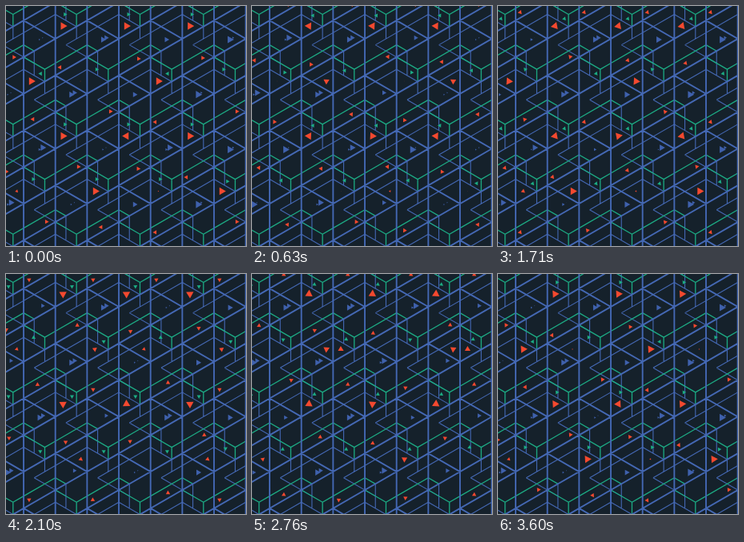
These frames come from a looping animation (300x300 px, 3.63 s). An HTML page with a canvas:

```html
<!DOCTYPE html>
<html lang="en">
<head>
<meta charset="utf-8">
<title>Isometric pattern</title>
<style>
html, body { margin: 0; width: 100%; height: 100%; overflow: hidden; background: #15212b; }
canvas { display: block; width: 300px; height: 300px; }
</style>
</head>
<body>
<canvas id="stage" width="300" height="300"></canvas>
<script>
const LOOP = 3630, TAU = Math.PI * 2;
const BG = '#15212b', BLUE = '#4468b4', DEEP = '#3f61ad', GREEN = '#1cab84', RED = '#f4492f';
const U = 13.222, V = U / Math.sqrt(3);
const ctx = document.getElementById('stage').getContext('2d');

// Static lattice: one motif in isometric units, repeated in staggered rows
const motif = [
  [BLUE, 1.1, [[1, 1, 6, -4], [1, 1, 4, 4], [4, 2, 4, 6], [-1, 7, -1, 9], [-3, 5, -1, 7], [-1, 7, 0, 6]]],
  [GREEN, 1.3, [[0, 4, 3, 1], [3, 1, 4, 2], [-3, 3, -1, 5], [-1, 5, 0, 4], [-1, 5, -1, 7]]],
  [BLUE, 1.9, [[-3, 3, 6, -6], [-3, -3, 0, 0], [0, -9, 0, 9]]]
];

function drawLattice(g) {
  g.fillStyle = BG;
  g.fillRect(0, 0, 300, 300);
  for (const [color, width, lines] of motif) {
    g.strokeStyle = color;
    g.lineWidth = width;
    g.beginPath();
    for (let row = -2; row < 6; row++) {
      for (let col = -2; col < 5; col++) {
        const x = 61.7 + col * 6 * U + (row & 1) * 3 * U, y = 41 + row * 9 * V;
        for (const [a, b, c, d] of lines) {
          g.moveTo(x + a * U, y + b * V);
          g.lineTo(x + c * U, y + d * V);
        }
      }
    }
    g.stroke();
  }
}

const lattice = document.createElement('canvas');
lattice.width = lattice.height = 300;
drawLattice(lattice.getContext('2d'));

function triangle(x, y, r, turn, color) {
  if (r < 0.2) return;
  ctx.fillStyle = color;
  ctx.beginPath();
  for (let i = 0; i < 3; i++) {
    const a = (turn + i / 3) * TAU;
    ctx.lineTo(x + r * Math.cos(a), y + r * Math.sin(a));
  }
  ctx.fill();
}

const wrap = t => t - Math.floor(t);
const wave = (t, peak) => Math.cos((t - peak) * TAU);
const dip = (t, low) => 2 * Math.sin(Math.PI * wrap(t - low)) - 1;
const hop = (t, low) => -dip(t, low);
const pulse = (t, peak) => {
  const d = Math.abs(wrap(t - peak + 0.5) - 0.5);
  return d < 0.18 ? Math.cos(d / 0.36 * Math.PI) : 0;
};

// Red sliders: centre, motion, phase
const sliders = [
  [-0.5, 70, dip, 0.4], [79, 70, wave, 0.5], [158.5, 70, dip, 0.7], [237, 70, dip, 0.345],
  [39, 138.5, hop, 0.74], [119, 138.5, wave, 0], [198, 138.5, hop, 0.48], [277, 138.5, wave, 0],
  [-0.5, 207.5, dip, 0.82], [79, 207.5, dip, 0.48], [158, 207.5, dip, 0.7], [237, 207.5, dip, 0],
  [39, 276.3, wave, 0], [119, 276.3, hop, 0.17], [198, 276.3, hop, 0.48], [277, 276.3, wave, 0],
  [39, 1.3, wave, 0], [119, 1.3, wave, 0], [198, 1.3, wave, 0], [277, 1.3, wave, 0]
];

// Red pulses: x, y, peak times
const pulses = [
  [13.5, 94, 0.46], [31.5, 94, 0], [93, 94, 0.25, 0.83], [111, 94, 0.68],
  [172.5, 94, 0.46], [190.5, 94, 0], [251.5, 94, 0.25, 0.83], [269.5, 94, 0.68],
  [13.5, 231.5, 0.87], [31.5, 231.5, 0.36], [93.5, 231.5, 0.47], [111.5, 231.5, 0],
  [172.5, 231.5, 0.32], [190.5, 231.5, 0.84], [252, 231.5, 0.47], [269.5, 231.5, 0]
];

// Phase shift of each blue pair, by row; null keeps both visible
const shifts = [
  [0, null, -0.08, 0.33], [0, null, -0.08, 0.33],
  [0.18, 0, 0.18, 0.33], [0.18, 0, -0.08, 0.33]
];

function drawBlue(t) {
  shifts.forEach((row, j) => row.forEach((shift, i) => {
    const x = 41.7 + i * 6 * U - (j & 1) * 3 * U, y = 42 + j * 9 * V;
    const size = peak => shift === null ? 0.8 : 0.5 + 0.5 * Math.cos(2 * TAU * (t + shift - peak));
    triangle(x, y, 5.3 * size(0.33), 0, DEEP);
    triangle(x + 4, y - 2.3, 4.6 * size(0.18), 0, DEEP);
  }));
}

function drawGreen(t) {
  for (let j = 0; j < 4; j++) {
    for (let i = 0; i < 5; i++) {
      const x = -1 + i * 6 * U + (j & 1) * 3 * U, y = 13.2 + j * 9 * V;
      const flip = j === 1 && i % 2 === 0;
      const peak = flip ? 0 : j === 3 && i === 3 ? 0.25 : 0.5;
      const s = 4.7 * wave(t, peak);
      triangle(x, y + s * V / U, 2.9, t + (flip ? 0.5 : 0), GREEN) ;
    }
  }
}

function drawGreenSlide(t) {
  for (let j = 0; j < 4; j++) {
    for (let i = 0; i < 5; i++) {
      const flip = j === 1 && i % 2 === 0;
      const peak = flip ? 0 : j === 3 && i === 3 ? 0.25 : 0.5;
      const s = 4.7 * wave(t, peak);
      const x = -1 + i * 6 * U + (j & 1) * 3 * U + s;
      const y = 13.2 + j * 9 * V + s * V / U;
      triangle(x, y, 2.9, t + (flip ? 0.5 : 0), GREEN);
    }
  }
}

function drawRed(t) {
  for (const y of [25, 162.5]) {
    for (let i = 0; i < 3; i++) {
      triangle(71.2 + i * 6 * U, y, 5.4, t + (i === 1 && y > 100 ? 0.5 : 0), RED);
    }
  }
  for (const [x, y, ...peaks] of pulses) {
    for (const p of peaks) triangle(x, y, 5.4 * pulse(t, p), t - p, RED);
  }
  for (const [x, y, move, phase] of sliders) {
    const s = 11.5 * move(t, phase);
    triangle(x + s, y - s * V / U, 3.1, t + (move(0, phase) < 0 ? 0.5 : 0), RED);
  }
}

function frame(now) {
  const t = now % LOOP / LOOP;
  ctx.drawImage(lattice, 0, 0);
  drawBlue(t);
  drawGreenSlide(t);
  drawRed(t);
  requestAnimationFrame(frame);
}
requestAnimationFrame(frame);
</script>
</body>
</html>
```
